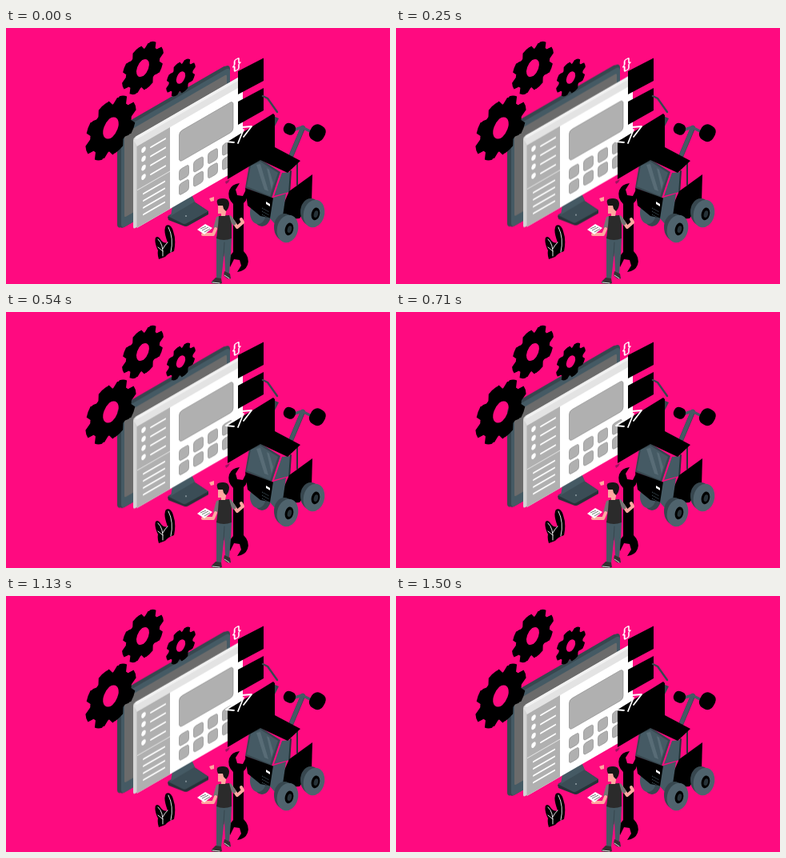
Animation, 480 px wide and 320 px high, one loop 1.54 s. Source, as an HTML page without scripts:

```html
<!DOCTYPE html>
<html lang="en">
<head>
<meta charset="utf-8">
<title>Web workshop</title>
<style>
  html, body { margin: 0; width: 100%; height: 100%; overflow: hidden; background: #ff0a80; }
  svg { display: block; width: 100%; height: 100%; }
  .monitor { animation: bob 1.54s cubic-bezier(.37, 0, .63, 1) infinite; }
  @keyframes bob { 50% { transform: translateY(-6px); } }
  .line { fill: none; stroke-linecap: round; stroke-linejoin: round; }
  .steel { fill: #455a64; }
  .dark { fill: #37474f; }
  .grey { fill: #b0b0b0; }
  .white { fill: #fff; }
  .skin { fill: #ffa8a0; }
  text { font: 16px "Liberation Sans", Arial, sans-serif; fill: #fff; stroke: #fff; stroke-width: .4; }
</style>
</head>
<body>
<svg viewBox="0 0 480 320">
  <defs>
    <path id="teeth" d="M-9 -26L-6 -34.5Q0 -36 6 -34.5L9 -26ZM-9 26L-6 34.5Q0 36 6 34.5L9 26Z"/>
    <g id="cog" transform="matrix(.866 -.5 0 1 0 0) rotate(28)">
      <circle r="20.5" fill="none" stroke="#000" stroke-width="15"/>
      <use href="#teeth"/>
      <use href="#teeth" transform="rotate(45)"/>
      <use href="#teeth" transform="rotate(90)"/>
      <use href="#teeth" transform="rotate(135)"/>
    </g>
    <g id="gear">
      <use href="#cog" x="-1.5" y="1"/>
      <use href="#cog" x="1.5" y="-1"/>
    </g>
    <rect id="tile" width="12" height="14" rx="3"/>
    <g id="tiles">
      <use href="#tile"/><use href="#tile" x="18"/><use href="#tile" x="36"/><use href="#tile" x="54"/>
    </g>
    <g id="item">
      <ellipse cx="12" cy="21" rx="2.8" ry="3.4" class="white"/>
      <path d="M21 23H39" stroke="#fff" stroke-width="2" class="line"/>
    </g>
    <path id="row" d="M12 76H38" stroke="#fff" stroke-width="2" class="line"/>
    <g id="wheel">
      <ellipse cx="-4" cy="-2" rx="13" ry="17" class="dark"/>
      <ellipse rx="13" ry="17.5" transform="rotate(14)" fill="#4f636d"/>
      <ellipse cx="2" rx="5.2" ry="8" transform="rotate(14)"/>
      <ellipse cx="2.5" rx="2.6" ry="4.5" transform="rotate(14)" fill="#263238"/>
    </g>
    <path id="jaw" d="M284 250V220Q276 212 279 203Q282 195 292 194L287 202L289 209L296 210L301 200Q304 213 297 219V250Z"/>
  </defs>

  <rect width="480" height="320" fill="#ff0a80"/>

  <g class="monitor">
    <path fill="#263238" d="M202 236L235 217L253 229V233L228 247Q225 249 221 247L203 240Z"/>
    <path fill="#3b4d56" d="M202 235L235 217L253 229L226 244Q223 246 220 244Z"/>
    <path class="steel" d="M208 222L232 208L236 217L214 230L206 235Z"/>
    <circle cx="225" cy="235" r=".8" fill="#cfd8dc"/>
    <g transform="translate(139 126) skewY(-30)">
      <rect y="-1" width="138" height="127" rx="6" class="dark"/>
      <rect x="3" width="138" height="128" rx="6" class="dark"/>
      <rect x="5" y="4" width="136" height="124" rx="5" class="steel"/>
      <rect x="9" y="11" width="128" height="105" rx="2" fill="#6b6b6b"/>
    </g>
    <g transform="translate(160 138) skewY(-30)">
      <rect x="-1" y="-1" width="10" height="114" rx="3" fill="#d4d4d4"/>
      <path class="white" d="M4 0H136V114H4Z"/>
      <path d="M0 3Q0 0 3 -1H136V12H4Z" fill="#e3e3e3"/>
      <path d="M1 1L3 -1H136V3H4Z" fill="#f2f2f2"/>
      <path d="M3.5 12H45V114H3.5Z" class="grey"/>
      <path d="M4 67H45" stroke="#e6e6e6"/>
      <use href="#item"/><use href="#item" y="11.3"/><use href="#item" y="22.6"/><use href="#item" y="34"/>
      <use href="#row"/><use href="#row" y="8.7"/><use href="#row" y="17.4"/><use href="#row" y="26"/>
      <g class="grey" stroke="#8c8c8c" stroke-width=".6">
        <rect x="56.5" y="24.5" width="67.5" height="38" rx="4"/>
        <use href="#tiles" x="56.5" y="72"/>
        <use href="#tiles" x="56.5" y="90"/>
      </g>
    </g>
  </g>

  <use href="#gear" x="131" y="125"/>
  <use href="#gear" transform="translate(171 50) scale(.82)"/>
  <use href="#gear" transform="translate(218.5 62) scale(.58)"/>

  <!-- code panels -->
  <path d="M290 54L322 37.5V66L290 83ZM290 92L322 75V103L290 121Z"/>
  <text transform="translate(283 53) skewY(-30)">{}</text>
  <path class="line" d="M321 85L327 88L339 105" stroke="#37474f" stroke-width="2.4"/>
  <path class="dark" d="M334 110L341 113L335 125Z"/>
  <path d="M274 192L280 189L278 193L275 195Z" fill="#9c1460"/>

  <!-- vehicle -->
  <g>
    <ellipse cx="320" cy="233" rx="11" ry="15" class="dark"/>
    <ellipse cx="315" cy="231" rx="10" ry="14" class="steel"/>
    <path class="line" d="M371 125L355 163" stroke="#37474f" stroke-width="6"/>
    <path class="line" d="M371 124L357 158" stroke="#455a64" stroke-width="5"/>
    <path class="line" d="M361 127L370 124L384 131" stroke="#455a64" stroke-width="3.5"/>
    <rect x="347" y="119" width="15" height="14" rx="6" transform="rotate(25 354 126)"/>
    <rect x="380" y="121" width="19" height="21" rx="8" transform="rotate(28 390 131)"/>
    <path class="dark" d="M304 171L318 164L343 180L332 213L299 200Z"/>
    <path class="steel" d="M306 172L318 167L340 181L330 210L301 198Z"/>
    <path fill="#586c76" d="M313 171L318 170L328 204L323 202ZM326 175L329 177L334 194L332 202Z"/>
    <path class="steel" d="M345 181L356 180L354 205L335 210Z"/>
    <path class="line" d="M356 179L354 207M364 168V196" stroke="#263238" stroke-width="2"/>
    <path d="M299 200L335 213L332 238L318 235L302 222Z"/>
    <path d="M354 204L383 183L382 217L367 238L344 240L346 222Z"/>
    <path class="steel" d="M334 212L350 207L346 235L337 246L330 238Z"/>
    <path class="white" d="M325 217L330 220V223L325 220Z"/>
    <path d="M320 225L329 230M320 229L329 234M320 233L329 238" stroke="#455a64" stroke-dasharray="1.5 1"/>
    <use href="#wheel" x="385" y="232"/>
    <use href="#wheel" x="352" y="251"/>
  </g>
  <path d="M277 142L334 107L336 109V149L368 166L352 181L318 165L304 173L277 189Z"/>
  <path class="line" d="M287 134L275 142L285 143M297 127L290 144M295 124L307 123L297 136" stroke="#fff" stroke-width="1.8"/>

  <!-- wrench -->
  <use href="#jaw"/>
  <use href="#jaw" transform="rotate(180 290.5 249.5)"/>

  <!-- worker -->
  <path fill="#ffa8a0" d="M254 213L260 211V216L256 217Z"/>
  <path class="steel" d="M263 261H282L281 284L279 306H274L273 280L269 314H263Z"/>
  <path class="line" d="M273 268L272 285" stroke="#37474f"/>
  <path fill="#333" d="M262 312L269 313L270 319Q265 321 257 319V317ZM273 304L280 307L281 313Q277 315 272 309Z"/>
  <path class="line" d="M258 318L267 319M273 309L279 313" stroke="#ddd"/>
  <path class="line" d="M282 239L289 249L296 243L294 239" stroke="#ffa8a0" stroke-width="4"/>
  <path class="line" d="M265 238L262 249" stroke="#757575" stroke-width="5"/>
  <path class="line" d="M280 237L285 244" stroke="#757575" stroke-width="5"/>
  <path class="line" d="M262 251L259 258L246 258" stroke="#ffa8a0" stroke-width="4"/>
  <path fill="#2b2b2b" d="M266 235L279 234L282 245V263Q272 267 263 263L265 247Z"/>
  <path class="skin" d="M265 221H275V230L274 235H269V232H265Z"/>
  <path fill="#161616" d="M264 219Q262 213 270 213Q278 212 279 219Q279 225 275 229L272 226L271 222L265 222Z"/>
  <path class="white" d="M239 252L249 245L258 250L248 258Z"/>
  <path d="M243 251L250 248M245 253L253 249M248 255L255 251" stroke="#555" stroke-width=".8"/>

  <!-- plant -->
  <path d="M191 289Q189 283 190 278Q185 268 187 262Q190 259 193 264Q197 270 202 268Q196 252 200 247Q206 244 209 254Q213 265 210 279Q203 281 199 286Z"/>
  <path class="line" d="M203 249Q210 263 206 280M190 264Q197 270 196 285M202 268Q198 272 196 276M190 274L196 279" stroke="#fff" stroke-width=".9"/>
</svg>
</body>
</html>
```
